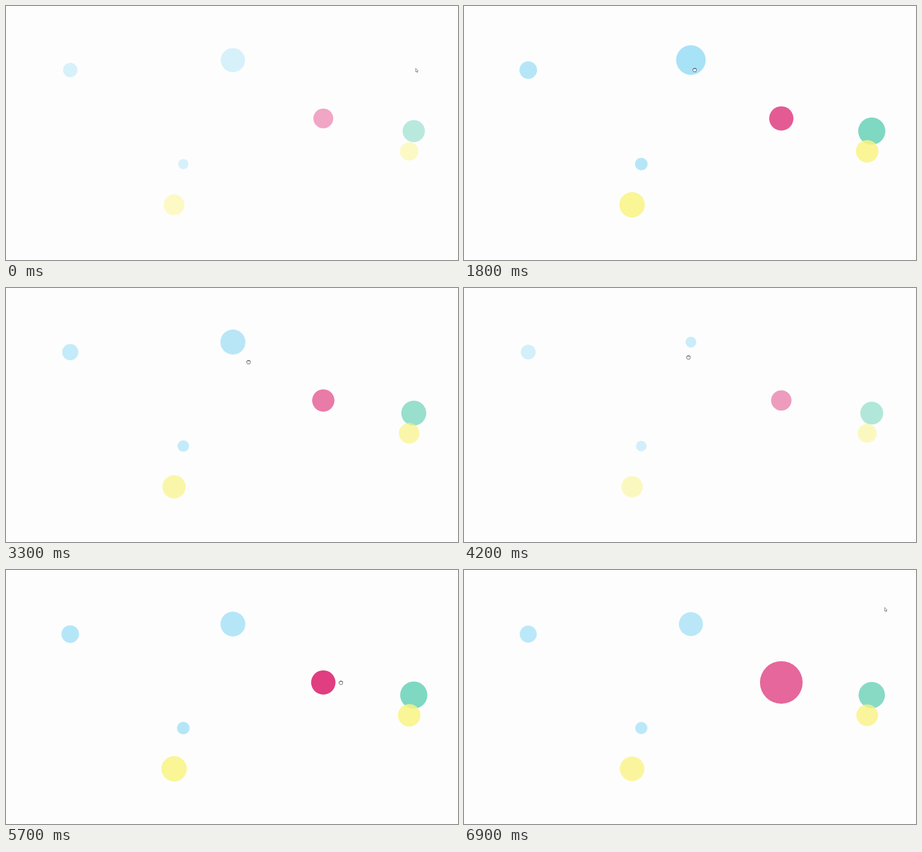
Write an HTML page that moves like this. It is 800 by 450 pixels and loops after 7 s.

```html
<!DOCTYPE html>
<html lang="en">
<head>
<meta charset="utf-8">
<title>Pulsing dots</title>
<style>
html, body { margin: 0; width: 100%; height: 100%; overflow: hidden; background: #fdfdfd; }
svg { display: block; width: 100vw; height: 100vh; }
</style>
</head>
<body>
<svg viewBox="0 0 800 450">
  <g id="dots"></g>
  <path id="arrow" d="M.1 .4V6.8L1.5 5.6 2.6 7.9 3.5 7.5 2.6 5.2H4.5Z" fill="#fff" stroke="#555" stroke-width=".7" stroke-linejoin="round"/>
  <path id="hand" d="M-1.6 3.5-3.5 0-2.4-.4V-2L-1-2.5 .6-2.8 2-2.3 3.3-1.6V.8L2.4 3.5ZM-.9-2.4V-1M.7-2.7V-1M2.1-2.2V-.9" fill="#fff" stroke="#333" stroke-width=".75" stroke-linejoin="round"/>
</svg>
<script>
const LOOP = 7000, STEP = 100, HALF = 2000, LEAD = 50, FADE = 200;
const BLUE = "rgb(168,226,247)", PINK = "rgb(224,62,129)";
const YELLOW = "rgb(250,244,130)", GREEN = "rgb(104,209,183)";
const $ = id => document.getElementById(id);

// Smooth step from 0 to 1 between times a and b
function ramp(t, a, b) {
  const u = Math.min(1, Math.max(0, (t - a) / (b - a)));
  return u * u * (3 - 2 * u);
}

// The two draggable dots have a size that depends on time and are held for a while
const blueSize = t => 26.2 + 25.5 * ramp(t, 2200, 2580) - 40.3 * ramp(t, 2800, 3600) + 10.6 * ramp(t, 4200, 4500);
const pinkSize = t => 21.5 - 17.3 * ramp(t, 4750, 5100) + 34.8 * ramp(t, 5100, 6300);

const dot = (x, y, r, fill, holds = []) => ({ x, y, r, fill, holds });
const dots = [
  dot(113.7, 113.6, 15.6, BLUE),
  dot(401.6, 95.8, blueSize, BLUE, [[1600, 2500], [2900, 4400]]),
  dot(561.6, 199.2, pinkSize, PINK, [[4650, 6400]]),
  dot(721.7, 221.6, 24.1, GREEN),
  dot(713.6, 257.4, 19.9, YELLOW),
  dot(313.8, 280, 11.1, BLUE),
  dot(297.5, 352.2, 22.5, YELLOW)
];

// Pointer stops: time, x, y
const stops = [[0, 725, 110], [1800, 408, 113], [2600, 451, 136.6], [4200, 397, 122.6],
  [5100, 574, 203], [6400, 616, 194.8], [6900, 744.5, 66]];

for (const d of dots) {
  d.el = document.createElementNS("http://www.w3.org/2000/svg", "circle");
  d.el.setAttribute("cx", d.x);
  d.el.setAttribute("cy", d.y);
  d.el.setAttribute("fill", d.fill);
  $("dots").append(d.el);
}

// The CSS "ease" curve: cubic-bezier(.25, .1, .25, 1)
function ease(x) {
  const bez = (u, a, b) => 3 * (1 - u) ** 2 * u * a + 3 * (1 - u) * u * u * b + u ** 3;
  let lo = 0, hi = 1;
  for (let i = 0; i < 24; i++) {
    const mid = (lo + hi) / 2;
    if (bez(mid, .25, .25) < x) lo = mid; else hi = mid;
  }
  return bez(lo, .1, 1);
}

function pointerAt(t) {
  let [, x, y] = stops[0];
  for (let i = 1; i < stops.length; i++) {
    const [a, ax, ay] = stops[i - 1], [b, bx, by] = stops[i];
    const k = ramp(t, a, b);
    x += (bx - ax) * k;
    y += (by - ay) * k;
  }
  return `translate(${x.toFixed(2)} ${y.toFixed(2)})`;
}

function draw(t) {
  const phase = ((t + LEAD) / HALF) % 2;
  const p = ease(phase > 1 ? 2 - phase : phase);
  const scale = .815 + .185 * p, alpha = .45 + .4 * p;
  let held = false;

  for (const d of dots) {
    const r = typeof d.r === "function" ? d.r(t) : d.r;
    let glow = 0;
    for (const [a, b] of d.holds) {
      glow += ramp(t, a, a + FADE) - ramp(t, b, b + FADE);
      held ||= t >= a && t < b;
    }
    d.el.setAttribute("r", (r * scale).toFixed(2));
    d.el.setAttribute("fill-opacity", Math.min(1, alpha * (1 + .19 * glow)).toFixed(3));
  }

  const place = pointerAt(t);
  for (const [id, on] of [["arrow", !held], ["hand", held]]) {
    $(id).setAttribute("transform", place);
    $(id).setAttribute("visibility", on ? "visible" : "hidden");
  }
}

const start = performance.now();
function tick() {
  const t = (performance.now() - start) % LOOP;
  draw(Math.floor(t / STEP) * STEP);
  requestAnimationFrame(tick);
}
draw(0);
requestAnimationFrame(tick);
</script>
</body>
</html>
```
